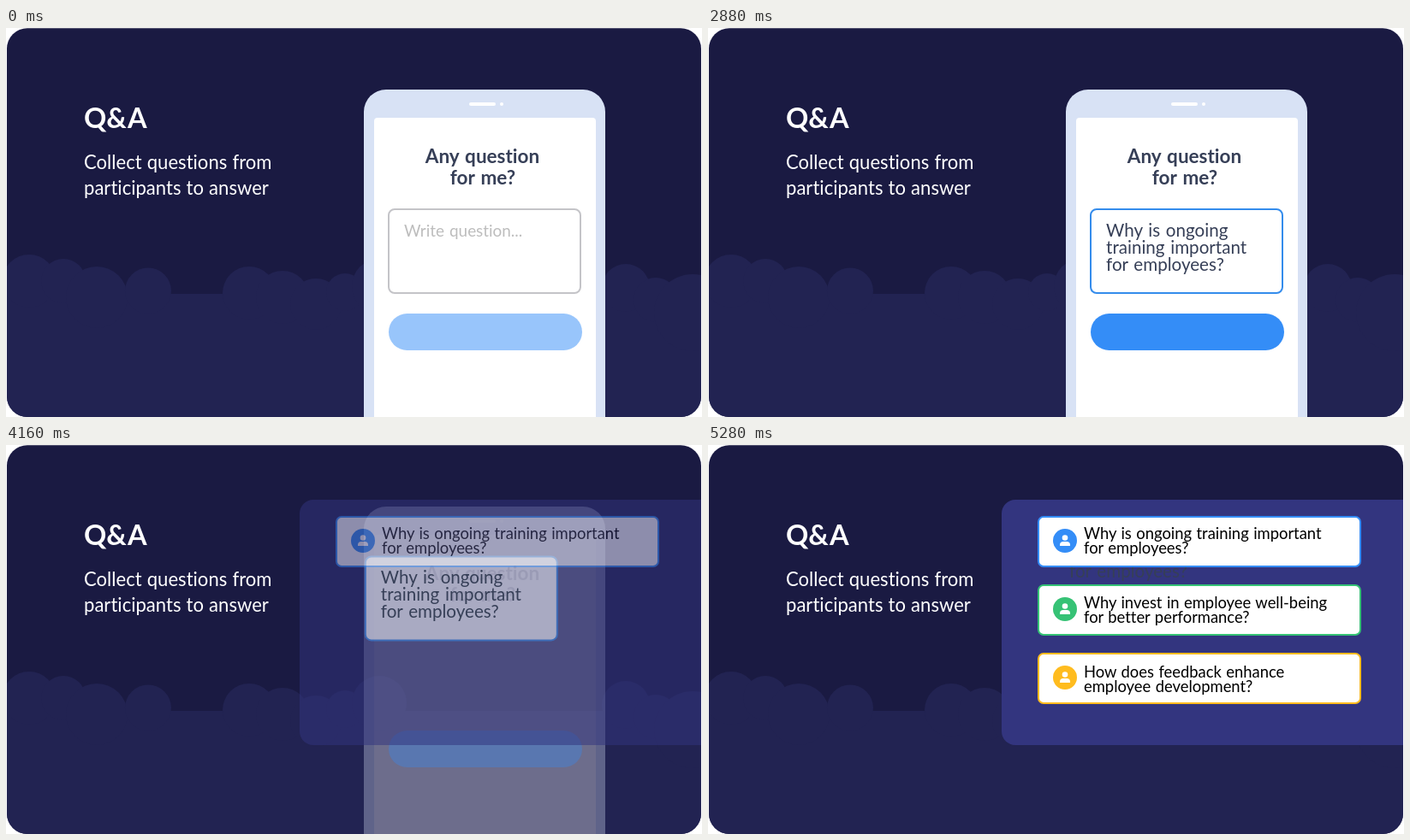
Recreate the animation shown at these times as an HTML page. Size 813 px wide and 455 px high, loop 6.52 s.

```html
<!DOCTYPE html>
<html lang="en">
<head>
<meta charset="utf-8">
<title>Q&amp;A</title>
<style>
  html, body { margin: 0; width: 100%; height: 100%; overflow: hidden; background: #fff; }
  svg { display: block; width: 813px; height: 455px; }
  text { font-family: Lato, "Open Sans", sans-serif; font-variant-ligatures: none; white-space: pre; }
  .head { font-size: 32.6px; font-weight: 700; fill: #fff; }
  .sub { font-size: 22.1px; fill: #fff; word-spacing: .02em; }
  .title { font-size: 22.5px; font-weight: 700; fill: #363f57; text-anchor: middle; word-spacing: .07em; }
  .hint { font-size: 18.9px; fill: #bdbdbd; word-spacing: .07em; }
  .typed { font-size: 20.6px; fill: #363f57; word-spacing: .07em; }
  .ask { font-size: 18.4px; fill: #000; word-spacing: .04em; }
</style>
</head>
<body>
<svg viewBox="0 0 813 455">
  <defs>
    <clipPath id="stage"><rect x="1" y="0.2" width="811" height="454.8" rx="24"/></clipPath>
  </defs>
  <g clip-path="url(#stage)">
    <rect width="813" height="455" fill="#1a1a42"/>
    <g id="clouds" fill="#222352"><rect y="311" width="813" height="144"/></g>
    <text class="head" x="91" y="117">Q&amp;A</text>
    <text class="sub" x="91" y="165">Collect questions from</text>
    <text class="sub" x="91" y="195">participants to answer</text>

    <g id="phone">
      <rect x="418" y="72" width="282" height="420" rx="26" fill="#d8e2f5"/>
      <rect x="430" y="105" width="259" height="400" rx="4" fill="#fff"/>
      <rect x="541" y="87" width="31" height="4" rx="2" fill="#fff"/>
      <circle cx="579" cy="89" r="2" fill="#fff"/>
      <text class="title" x="556.5" y="158">Any question</text>
      <text class="title" x="557" y="183">for me?</text>
    </g>
    <rect id="button" x="447" y="334" width="226" height="43" rx="21.5"/>

    <rect id="panel" x="343" y="64" width="500" height="287" rx="16" fill="#33357f"/>

    <g id="field">
      <rect id="box" x="447" y="212" width="224" height="98" rx="7" fill="#fff" stroke-width="2"/>
      <text id="hint" class="hint" x="465" y="244">Write question...</text>
      <g id="typed"></g>
      <rect id="caret" width="2" height="18" fill="#363f57"/>
    </g>
    <g id="cards"></g>

    <g id="tap" fill="#dadada" stroke="#dadada">
      <circle r="36" stroke="none"/>
      <circle r="47" fill="none" stroke-width="6"/>
    </g>
  </g>
</svg>
<script>
const LOOP = 6520, STEP = 40;
const $ = id => document.getElementById(id);

function add(parent, tag, attrs, text) {
  const el = document.createElementNS('http://www.w3.org/2000/svg', tag);
  for (const k in attrs) el.setAttribute(k, attrs[k]);
  if (text) el.textContent = text;
  parent.appendChild(el);
  return el;
}

// Cloud bumps: centre x, top y, radius
[[27, 265, 31], [67, 270, 26], [106, 279, 36], [166, 280.5, 27], [284, 279, 31],
 [323, 284, 31], [362, 293, 30], [396, 287, 22], [436, 270, 32], [724, 276, 28],
 [759, 292, 26], [802, 288, 45]
].forEach(([cx, top, r]) => add($('clouds'), 'circle', { cx, cy: top + r, r }));

const lines = ['Why is ongoing', 'training important', 'for employees?'];
const total = lines.join(' ').length;
const rows = lines.map((_, i) => add($('typed'), 'text', { class: 'typed', x: 465, y: 244 + i * 20 }));

const cards = [
  ['#348df7', 'Why is ongoing training important', 'for employees?'],
  ['#36c275', 'Why invest in employee well-being', 'for better performance?'],
  ['#ffbc1f', 'How does feedback enhance', 'employee development?']
].map(([color, a, b], i) => {
  const g = add($('cards'), 'g', {});
  const y = 84 + i * 80, base = 110 + i * 81;
  add(g, 'rect', { x: 386, y, width: 376, height: 58, rx: 6, fill: '#fff', stroke: color, 'stroke-width': 2 });
  add(g, 'circle', { cx: 417, cy: y + 28, r: 14, fill: color });
  add(g, 'circle', { cx: 417, cy: y + 24.5, r: 3.3, fill: '#fff' });
  add(g, 'path', { d: `M411 ${y + 34}v-1a4 4 0 0 1 4-4h4a4 4 0 0 1 4 4v1z`, fill: '#fff' });
  add(g, 'text', { class: 'ask', x: 439, y: base }, a);
  add(g, 'text', { class: 'ask', x: 439, y: base + 17 }, b);
  return g;
});

const part = (t, from, to) => Math.min(1, Math.max(0, (t - from) / (to - from)));
const ease = p => p < .5 ? 2 * p * p : 1 - 2 * (1 - p) ** 2;
const mix = (a, b, p) => `rgb(${a.map((v, i) => Math.round(v + (b[i] - v) * p))})`;

const GREY = [196, 196, 200], PALE = [152, 197, 251], BLUE = [52, 141, 247], DEEP = [26, 120, 229];
const EDGE = [52, 140, 236];

function drawText(t) {
  const typing = t >= 1760;
  let left = Math.round(part(t, 1720, 2880) * total), row = 0;
  lines.forEach((line, i) => {
    rows[i].textContent = line.slice(0, Math.max(0, left));
    if (left > 0) row = i;
    left -= line.length + 1;
  });
  $('hint').style.display = t < 1320 ? '' : 'none';
  const caret = $('caret');
  caret.style.display = (t >= 1320 && t < 1600) || (typing && t < 2880) ? '' : 'none';
  caret.setAttribute('x', typing ? 466 + rows[row].getComputedTextLength() : 467);
  caret.setAttribute('y', 229 + row * 20);
}

function drawTap(t) {
  const [y, start, peak, end] = t < 2000 ? [230, 640, 880, 1120] : [331.5, 3320, 3680, 3920];
  const grow = ease(part(t, start, peak)), fade = part(t, peak, end);
  $('tap').setAttribute('transform', `translate(585.5 ${y}) scale(${.6 + .4 * grow})`);
  $('tap').setAttribute('opacity', .62 * grow * (1 - ease(fade)));
}

function drawButton(t) {
  const press = part(t, 3480, 3680) - part(t, 3680, 3920);
  $('button').setAttribute('fill', t < 3000
    ? mix(PALE, BLUE, part(t, 1720, 1960))
    : mix(BLUE, DEEP, press));
}

function drawSwitch(t) {
  const e = ease(part(t, 4000, 4280));
  const rest = 1 - e ** .9;
  $('phone').setAttribute('opacity', rest);
  $('button').setAttribute('opacity', rest);
  $('panel').setAttribute('opacity', e ** 1.4);
  $('field').setAttribute('transform', `translate(${-43 * e} ${-129 * e})`);
  $('box').setAttribute('opacity', 1 - part(e, .3, 1));
  cards[0].setAttribute('opacity', part(e, .3, 1));
  [4600, 5120].forEach((start, i) => {
    const p = ease(part(t, start, start + 160));
    cards[i + 1].setAttribute('opacity', p);
    cards[i + 1].setAttribute('transform', `translate(0 ${-48 * (1 - p)})`);
  });
}

function draw(time) {
  const t = Math.floor(time % LOOP / STEP) * STEP;
  $('box').setAttribute('stroke', mix(GREY, EDGE, part(t, 840, 1080)));
  drawText(t);
  drawTap(t);
  drawButton(t);
  drawSwitch(t);
}

const begin = performance.now();
function tick() {
  draw(performance.now() - begin);
  requestAnimationFrame(tick);
}
tick();
</script>
</body>
</html>
```
